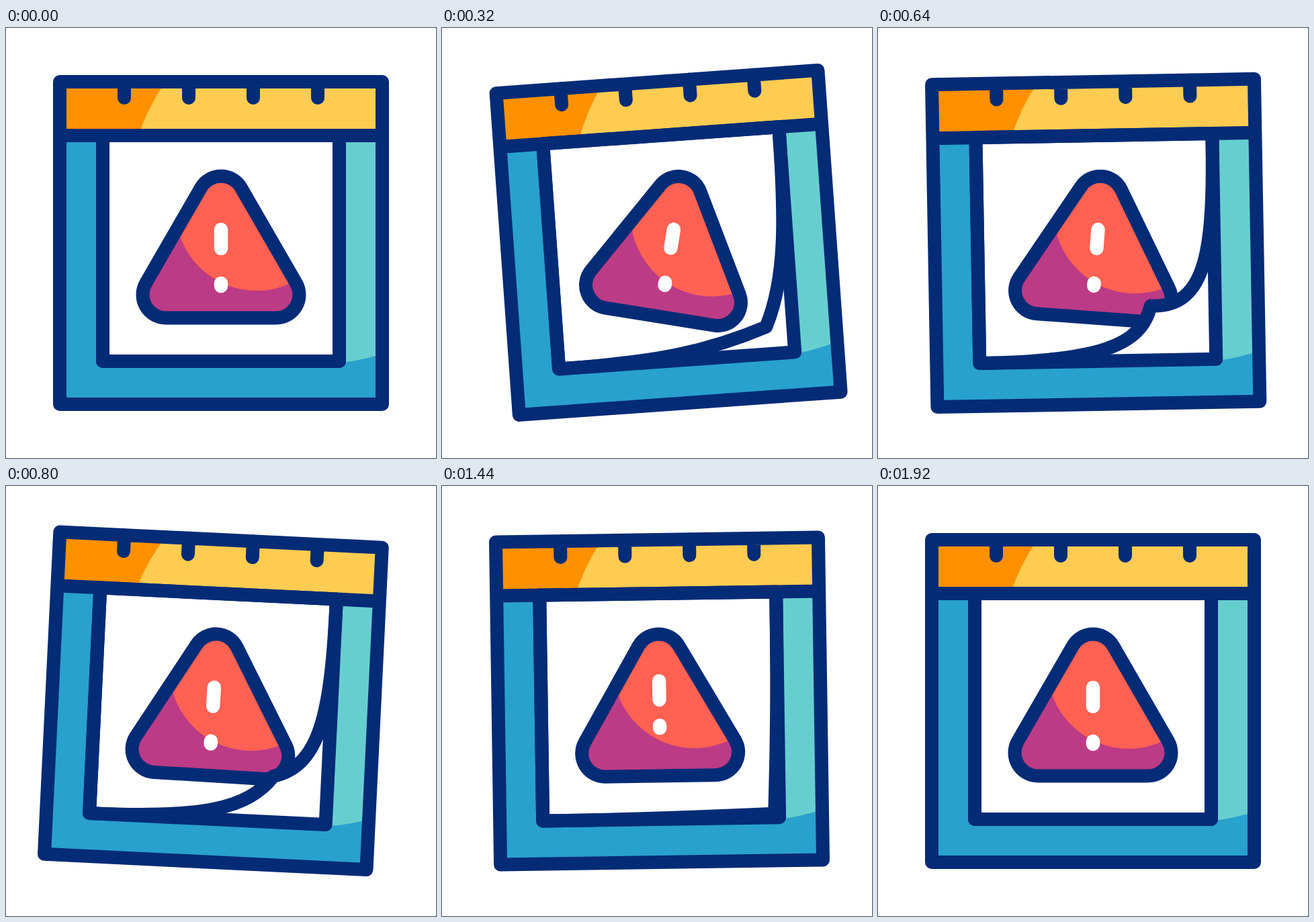
Recreate the animation shown at these times as an HTML page. Size 640 px wide and 640 px high, loop 2000 ms.

```html
<!DOCTYPE html>
<html lang="en">
<head>
<meta charset="utf-8">
<title>Calendar alert</title>
<style>
  html, body { margin: 0; width: 100%; height: 100%; overflow: hidden; background: #fff; }
  svg { display: block; width: 100%; height: 100%; }
  .line { fill: none; stroke: #042b76; stroke-width: 20; stroke-linecap: round; stroke-linejoin: round; }
  .mark { fill: none; stroke: #fff; stroke-width: 20.5; stroke-linecap: round; }
</style>
</head>
<body>
<svg viewBox="0 0 640 640">
  <defs>
    <path id="triangle" d="M208.1 379.75 L290.1 237.75 A34.5 34.5 0 0 1 349.9 237.75 L431.9 379.75 A34.5 34.5 0 0 1 402 431.5 H238 A34.5 34.5 0 0 1 208.1 379.75 Z"/>
    <path id="page"/>
    <clipPath id="inTriangle"><use href="#triangle"/></clipPath>
    <clipPath id="inPage"><use href="#page"/></clipPath>
  </defs>
  <g id="calendar">
    <path fill="#28a1cd" d="M80 160H560V560H80Z"/>
    <path fill="#67ced0" d="M496 160H560V485Q529 495 496 498.5Z"/>
    <path fill="#ff9100" d="M80 80H560V160H80Z"/>
    <path fill="#ffcc52" d="M237 80H560V160H197Q212 117 237 80Z"/>
    <path fill="#fff" d="M144 160H496V496H144Z"/>
    <path class="line" d="M144 160V496H496V160"/>
    <g clip-path="url(#inPage)">
      <g id="alert">
        <g clip-path="url(#inTriangle)">
          <path fill="#bc3b86" d="M190 200H450V450H190Z"/>
          <circle fill="#ff6152" cx="373" cy="270" r="121"/>
        </g>
        <use href="#triangle" class="line"/>
        <path id="bar" class="mark" d="M320 300V328"/>
        <path id="dot" class="mark" d="M320 380V384"/>
      </g>
    </g>
    <use href="#page" class="line"/>
    <path class="line" d="M80 80H560V560H80ZM80 160H560M176 80V104M272 80V104M368 80V104M464 80V104"/>
  </g>
</svg>
<script>
const el = id => document.getElementById(id);
const smooth = p => p * p * (3 - 2 * p);
const mix = (a, b, p) => a + (b - a) * p;

// Eased value at time f through [time, value] keys
function track(f, ...keys) {
  if (f <= keys[0][0]) return keys[0][1];
  for (let i = 1; i < keys.length; i++) {
    const [t0, a] = keys[i - 1], [t1, b] = keys[i];
    if (f <= t1) return mix(a, b, smooth((f - t0) / (t1 - t0)));
  }
  return keys[keys.length - 1][1];
}

// Page outline with its lower right corner curled up
function pagePath(f) {
  let k, kx;
  if (f < 16) {
    k = smooth(f / 16);
    kx = k ** 1.26;
  } else {
    const q = Math.max(0, (40 - f) / 24);
    k = kx = (smooth(q) + q ** 1.5) / 2;
  }
  const tip = [496 - 96 * kx, 496 - 81 * k];
  return `M144 160V496C${mix(270, 320, k)} 496 ${mix(350, 385, k)} ${mix(496, 475, k)} ${tip}` +
    `C${mix(496, 485, k)} ${mix(350, 420, k)} 496 ${mix(270, 330, k)} 496 160Z`;
}

function draw(now) {
  const f = Math.floor(now % 2000 / 40);
  const swing = track(f, [0, 0], [11, -5], [21, 3], [32, -1], [48, 0]);
  const tilt = track(f, [0, 0], [8, 13.2], [22, 0]);
  const hop = track(f, [21, 0], [35, -1], [48, 0]);
  el('calendar').setAttribute('transform', `rotate(${swing} 320 80)`);
  el('alert').setAttribute('transform', `rotate(${tilt} 320 340)`);
  el('bar').setAttribute('transform', `translate(0 ${10 * hop})`);
  el('dot').setAttribute('transform', `translate(0 ${24 * hop})`);
  el('page').setAttribute('d', pagePath(f));
}

const start = performance.now();
function loop() {
  draw(performance.now() - start);
  requestAnimationFrame(loop);
}
loop();
</script>
</body>
</html>
```
